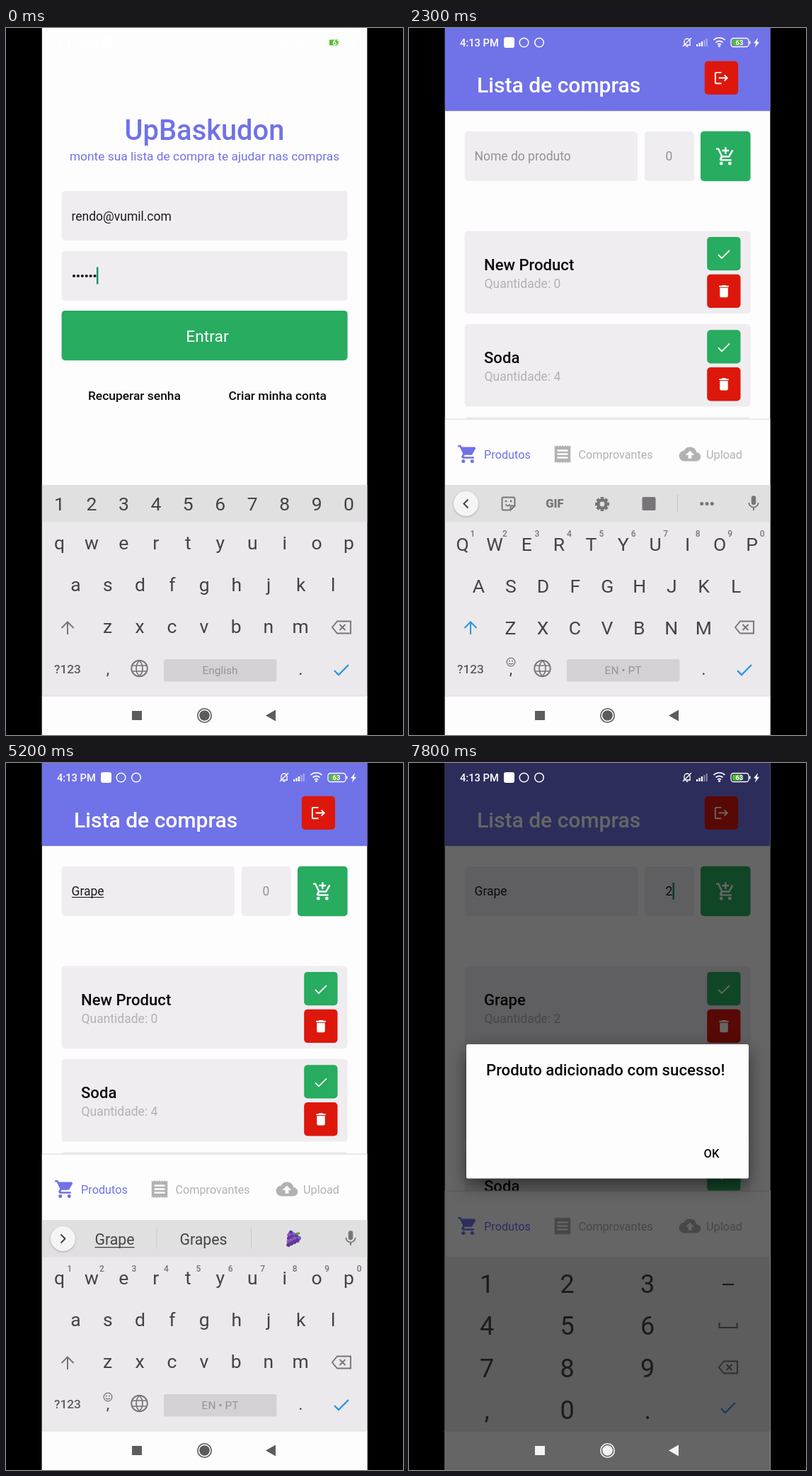
Animation, 561 px wide and 998 px high, one loop 8000 ms. Source, as an HTML page with a canvas:

```html
<!DOCTYPE html>
<html lang="pt">
<head>
<meta charset="utf-8">
<style>
html, body { margin: 0; width: 100%; height: 100%; overflow: hidden; background: #000; }
canvas { display: block; width: 561px; height: 998px; }
</style>
</head>
<body>
<canvas id="stage" width="561" height="998"></canvas>
<script>
const c = document.getElementById('stage').getContext('2d');
const LOOP = 8000, LEFT = 50.6, WIDTH = 460;
const WHITE = '#fefdfe', CARD = '#efedf0', PURPLE = '#7072e8', GREEN = '#27ac60', RED = '#de170c',
  INK = '#1c1b1c', HINT = '#949294', PALE = '#b3b1b3', KEY = '#454346', ICON = '#777577',
  BLUE = '#2b94df', CARET = '#168f68';

const CART = 'M1 2v2h2l3.6 7.6-1.4 2.4A2 2 0 0 0 7 17h12v-2H7.4l1.1-2h7.1a2 2 0 0 0 1.7-1';
const WHEELS = 'M5 20a2 2 0 1 0 4 0a2 2 0 1 0-4 0M15 20a2 2 0 1 0 4 0a2 2 0 1 0-4 0';
const icons = {
  cart: CART + 'L21 5.5 20 4H5.2L4.3 2z' + WHEELS,
  addCart: CART + 'L21.2 5 19.4 4 15.5 11h-7L4.3 2z' + WHEELS + 'M11 9h2V6h3V4h-3V1h-2v3H8v2h3z',
  cloud: 'M19.4 10A7.5 7.5 0 0 0 5.4 8A6 6 0 0 0 6 20h13a5 5 0 0 0 .4-10zM14 13v4h-4v-4H7l5-5 5 5z',
  trash: 'M6 19a2 2 0 0 0 2 2h8a2 2 0 0 0 2-2V7H6zM19 4h-3.5l-1-1h-5l-1 1H5v2h14z',
  exit: 'M17 7l-1.4 1.4L18.2 11H8v2h10.2l-2.6 2.6L17 17l5-5zM4 5h8V3H4a2 2 0 0 0-2 2v14a2 2 0 0 0 2 2h8v-2H4z',
  mic: 'M12 14a3 3 0 0 0 3-3V5a3 3 0 0 0-6 0v6a3 3 0 0 0 3 3zM17.3 11a5.3 5.3 0 0 1-10.6 0H5a7 7 0 0 0 6 6.7V21h2v-3.3a7 7 0 0 0 6-6.7z',
  receipt: 'M3 22' + 'l1.5-1.5 1.5 1.5'.repeat(6) + 'V2' + 'l-1.5 1.5-1.5-1.5'.repeat(6) + 'z'
    + [7, 11, 15].map(y => `M6 ${y}v2h12v-2z`).join('')
};

const clamp = v => Math.max(0, Math.min(1, v));
const inOut = p => p < .5 ? 2 * p * p : 1 - 2 * (1 - p) ** 2;
const ramp = (t, from, span) => inOut(clamp((t - from) / span));
const within = (t, from, to) => t >= from && t < to;

function text(s, x, y, size, color, weight = 400, align = 'left') {
  c.font = `${weight} ${size}px Roboto, sans-serif`;
  c.fillStyle = color;
  c.textAlign = align;
  c.fillText(s, x, y);
  return c.measureText(s).width;
}
const label = (s, x, y, size, color, weight) => text(s, x, y, size, color, weight, 'center');

function rect(x, y, w, h, color) {
  c.fillStyle = color;
  c.fillRect(x, y, w, h);
}

function box(x, y, w, h, color, r = 5) {
  c.fillStyle = color;
  c.beginPath();
  c.roundRect(x, y, w, h, r);
  c.fill();
}

function dot(x, y, r, color) {
  c.fillStyle = color;
  c.beginPath();
  c.arc(x, y, r, 0, 7);
  c.fill();
}

function stroke(path, color, width, x = 0, y = 0) {
  c.save();
  c.translate(x, y);
  c.strokeStyle = color;
  c.lineWidth = width;
  c.stroke(new Path2D(path));
  c.restore();
}

const ring = (x, y, r, color, width) =>
  stroke(`M${-r} 0a${r} ${r} 0 1 0 ${2 * r} 0a${r} ${r} 0 1 0 ${-2 * r} 0`, color, width, x, y);

function icon(name, x, y, size, color) {
  c.save();
  c.translate(x - size / 2, y - size / 2);
  c.scale(size / 24, size / 24);
  c.fillStyle = color;
  c.fill(new Path2D(icons[name]), 'evenodd');
  c.restore();
}

function shadowed(blur, dy, alpha, draw) {
  c.save();
  c.shadowColor = `rgba(0,0,0,${alpha})`;
  c.shadowBlur = blur;
  c.shadowOffsetY = dy;
  draw();
  c.restore();
}

const tick = (x, y, color, width) => stroke('M-8 1l5 5L8-5', color, width, x, y);
const caret = (x, y) => rect(x, y, 2.4, 24, CARET);

function faded(alpha, draw) {
  c.save();
  c.globalAlpha = alpha;
  draw();
  c.restore();
}

// Opacity of a button that is pressed and then released.
function pressAlpha(t, down, up) {
  const low = 1 - .8 * ramp(up, down, 150);
  return t < up ? 1 - .8 * ramp(t, down, 150) : low + (1 - low) * ramp(t, up, 250);
}

function statusBar() {
  text('4:13 PM', 72, 25.5, 14.7, '#fff', 500);
  box(134, 13, 15, 15, '#fff', 3);
  ring(162.5, 20.5, 6.3, '#fff', 1.5);
  ring(184, 20.5, 6.3, '#fff', 1.5);
  stroke('M-5 4H5M-4 4V-1a4 4 0 0 1 8 0V4M-1.5 6h3M-6 6L6-6', '#fff', 1.3, 393, 20);
  for (let i = 0; i < 5; i++) {
    const h = 3 + i * 2;
    rect(406 + i * 3.4, 26 - h, 2.2, h, i < 3 ? '#fff' : 'rgba(255,255,255,.4)');
  }
  stroke('M-8-2a11.5 11.5 0 0 1 16 0M-5 1.5a7 7 0 0 1 10 0M-2.5 4.5a3.5 3.5 0 0 1 5 0', '#fff', 1.7, 438.5, 19);
  dot(438.5, 25.5, 1.6, '#fff');
  c.strokeStyle = '#fff';
  c.lineWidth = 1.3;
  c.beginPath();
  c.roundRect(455, 14.5, 25, 12, 3.5);
  c.stroke();
  rect(481, 18.5, 1.5, 4, '#fff');
  box(457, 16.5, 13, 8, '#55bd2e', 1);
  label('63', 467, 24, 9.5, '#fff', 700);
  c.fillStyle = '#fff';
  c.fill(new Path2D('M493 14l-6 7.5h3.2l-1.2 6 6-7.8h-3.3z'));
}

function navBar(color) {
  rect(178, 964, 14, 13, color);
  ring(280.5, 970.5, 9.7, color, 1.6);
  dot(280.5, 970.5, 7.3, color);
  c.fillStyle = color;
  c.fill(new Path2D('M367 970.5l14-8v16z'));
}

function login(t) {
  rect(LEFT, 0, WIDTH, 998, WHITE);
  label('UpBaskudon', 280.5, 158, 39.8, PURPLE, 500);
  label('monte sua lista de compra te ajudar nas compras', 280.5, 187, 17.35, PURPLE);
  box(78.6, 230, 404, 70, CARD);
  box(78.6, 314.7, 404, 70, CARD);
  text('rendo@vumil.com', 92.5, 272, 17.5, INK);
  for (let i = 0; i < 6; i++) dot(96 + i * 5.9, 350, 2.1, INK);
  if (t < 100 || t >= 600) caret(128, 337.5);
  box(78.6, 398.9, 404, 70.4, GREEN);
  label('Entrar', 284.5, 443, 22.8, '#fff');
  text('Recuperar senha', 116, 525, 17.4, '#0a0a0a', 500);
  text('Criar minha conta', 314.5, 525, 17.4, '#0a0a0a', 500);
}

function card([name, amount], i) {
  const y = 286.5 + i * 131.3;
  box(78.6, y, 404, 116.8, CARD);
  text(name, 106, y + 55.5, 22.1, '#0a0a0a', 500);
  text('Quantidade: ' + amount, 106.5, y + 80.5, 17.5, PALE);
  box(421.2, y + 8.4, 47.3, 47.3, GREEN);
  tick(445, y + 32.5, '#fff', 1.8);
  box(421.2, y + 61.3, 47.3, 47.3, RED);
  icon('trash', 445, y + 85, 23, '#fff');
}

function tabs(top) {
  rect(LEFT, top, WIDTH, 998 - top, WHITE);
  rect(LEFT, top - .5, WIDTH, 1.3, '#e2e1e2');
  const y = top + 49.5;
  icon('cart', 83, y, 30, PURPLE);
  text('Produtos', 106, y + 6, 16.3, PURPLE);
  icon('receipt', 217, y, 30, PALE);
  text('Comprovantes', 239.5, y + 6, 16.2, PALE);
  icon('cloud', 397, y, 30, PALE);
  text('Upload', 420, y + 6, 16.3, PALE);
}

const typed = [[3050, 'G'], [3200, 'Gr'], [3350, 'Gra'], [3580, 'Grap'], [3740, 'Grape'],
  [3860, 'Grapes'], [4580, 'Grape']];
const nameAt = t => typed.reduce((s, [at, word]) => t >= at ? word : s, '');

function shop(t) {
  rect(LEFT, 0, WIDTH, 998, WHITE);
  rect(LEFT, 0, WIDTH, 117.2, PURPLE);
  text('Lista de compras', 96, 91, 30, '#fff', 500);
  box(417.8, 46.8, 47.3, 47.3, RED);
  icon('exit', 441.5, 70.5, 23, '#fff');

  const name = nameAt(t);
  box(78.6, 146, 244.5, 70, CARD);
  const w = text(name || 'Nome do produto', 92.5, 187, 17.5, name ? INK : HINT);
  if (name && t < 5500) rect(93, 189, w - 1, 1.1, INK);
  const nameCaret = within(t, 1800, 2300) || within(t, 2800, 4400) || within(t, 4580, 5200);
  if (nameCaret) caret(92 + (name ? w : 0), 169);

  const filled = t >= 6300;
  box(332.8, 146, 70.2, 70, CARD);
  label(filled ? '2' : '0', 367.5, 187, 17.5, filled ? INK : HINT);
  if (within(t, 5500, 6000) || within(t, 6300, 6800) || t >= 7300)
    caret(filled ? 372.5 : 366.5, 169);

  faded(pressAlpha(t, 6830, 6930), () => {
    box(412, 145.8, 70.6, 70.4, GREEN);
    icon('addCart', 447.3, 181.5, 29, '#fff');
  });

  const items = [['New Product', 0], ['Soda', 4], ['Avocado', 7]];
  if (t >= 7450) items.unshift(['Grape', 2]);
  if (t >= 950) items.forEach(card);
  tabs(t >= 5600 ? 604 : t >= 1900 ? 552 : 849);
}

const rows = [['qwertyuiop', 75.5, 736], ['asdfghjkl', 98.5, 794.5], ['zxcvbnm', 143.5, 853.5]];
const step = 45.45;

function backspace(x, y) {
  stroke('M-13 0L-6-8.5H13V8.5H-6zM-2.5-4l8 8M5.5-4l-8 8', ICON, 1.9, x, y);
}

function chevron(dir) {
  shadowed(3, 1, .25, () => dot(80.5, 671.5, 17.5, '#f6f5f6'));
  stroke(`M${-3 * dir}-6L${3 * dir} 0L${-3 * dir} 6`, KEY, 2, 80.5, 671.5);
}

function toolbar() {
  chevron(-1);
  stroke('M-9-7a2 2 0 0 1 2-2H7a2 2 0 0 1 2 2V3L3 9H-7a2 2 0 0 1-2-2zM9 3H3V9M-4 1q3 4 6 0', ICON, 2, 140.5, 671.5);
  dot(137, 668, 1.4, ICON);
  dot(144, 668, 1.4, ICON);
  label('GIF', 206, 677, 16.5, ICON, 900);
  c.save();
  c.translate(273, 672);
  for (let i = 0; i < 8; i++) {
    c.rotate(Math.PI / 4);
    rect(-2.3, -10, 4.6, 5, ICON);
  }
  c.restore();
  ring(273, 672, 5.5, ICON, 4.2);
  box(329.5, 662, 19, 19, ICON, 2);
  rect(379, 659, 1, 25, '#c4c2c4');
  for (let i = -1; i < 2; i++) dot(421 + i * 7.3, 671.5, 2.5, ICON);
  icon('mic', 487, 671, 26, ICON);
}

function grapes(x, y) {
  c.save();
  c.translate(x, y);
  c.rotate(.6);
  [4, 4, 3, 2, 1].forEach((n, row) => {
    for (let i = 0; i < n; i++)
      dot((i - (n - 1) / 2) * 4.6, row * 4 - 5, 3, (i + row) % 2 ? '#8a55c4' : '#5f3a98');
  });
  stroke('M0-7q1-3 4-4', '#4f9a3b', 3);
  c.restore();
}

const guesses = {
  G: ['Gente', 'Grande'], Gr: ['Grande', 'Grupo'], Gra: ['Graças', 'Grande'],
  Grap: ['Grape', 'Graph'], Grape: ['Grapes', ''], Grapes: ['Grape', '']
};

function suggestions(word) {
  chevron(1);
  const w = label(word, 153.5, 680, 21.3, KEY);
  rect(153.5 - w / 2, 683, w, 1.3, KEY);
  guesses[word].forEach((s, i) => label(s, 279 + i * 126, 680, 21.3, KEY));
  if (word.startsWith('Grape')) grapes(405.5, 671);
  rect(212.5, 657, 1, 29, '#cccacc');
  rect(346, 657, 1, 29, '#cccacc');
  icon('mic', 487, 671, 26, ICON);
}

function letters(upper, plain, word, erasing) {
  rect(LEFT, 645, WIDTH, 298, '#ebe9eb');
  rect(LEFT, 645, WIDTH, 52.5, '#e1e0e1');
  const digits = [...'1234567890'];
  if (plain) digits.forEach((d, i) => label(d, 75.5 + i * step, 681.3, 26.5, KEY));
  else word ? suggestions(word) : toolbar();
  for (const [keys, x, y] of rows)
    [...keys].forEach((k, i) =>
      label(upper ? k.toUpperCase() : k, x + i * step, y + (upper ? 2.2 : 0), 26.5, KEY));
  if (!plain) digits.forEach((d, i) => label(d, 90 + i * step, 717.5, 12, ICON, 500));
  stroke('M0 9V-8M-8.5 0L0-8.5L8.5 0', upper ? BLUE : ICON, 2, 87, 847);
  if (erasing) box(443, 822, 62, 48, '#dad8da');
  backspace(474, 846);
  label('?123', 87, 910.5, 17.3, '#5f5d60', 500);
  label(',', 144, 912, 22, KEY);
  if (!plain) {
    ring(144, 895, 5.8, ICON, 1.3);
    dot(142, 893.5, 1, ICON);
    dot(146, 893.5, 1, ICON);
    stroke('M-3 1.5q3 3 6 0', ICON, 1.2, 144, 895);
  }
  ring(188.5, 904, 11.3, ICON, 1.9);
  stroke('M-10-4H10M-10 4H10M0-11C-6-5-6 5 0 11C6 5 6-5 0-11', ICON, 1.7, 188.5, 904);
  box(223, 891, 159.5, 31.5, '#d3d1d3', 3);
  label(plain ? 'English' : 'EN • PT', 302.5, 912, 15.5, '#969496');
  label('.', 416.5, 913, 24, KEY);
  stroke('M-10 1l6 6L10-7', BLUE, 2.3, 474, 906);
}

function popup(key) {
  for (const [keys, start, y] of rows) {
    const i = keys.indexOf(key.toLowerCase());
    if (i < 0) continue;
    const x = start + i * step;
    shadowed(5, 2, .35, () => box(x - 22, y - 114, 44, 129, WHITE, 4));
    label(key, x, y - 68.5, 32, KEY);
    if (keys === rows[0][0]) label('...', x + 11.5, y - 54.5, 16, KEY);
  }
}

function numberPad() {
  rect(LEFT, 697, WIDTH, 246, '#ebe9eb');
  ['123', '456', '789', ',0.'].forEach((row, r) =>
    [...row].forEach((k, i) => label(k, 110 + i * 113.6, 748 + r * 59.4, 36, KEY)));
  rect(443, 735, 16, 2.2, KEY);
  stroke('M-12.5-5V2H12.5V-5', ICON, 2.2, 451, 795);
  backspace(451, 853);
  stroke('M-10 1l6 6L10-7', BLUE, 2, 451, 910);
}

const popups = [['G', 2960, 3080], ['r', 3120, 3230], ['a', 3280, 3390], ['p', 3450, 3580],
  ['e', 3640, 3750], ['s', 3780, 3870]];

// Share of the keyboard that is below the screen: it leaves speeding up and enters slowing down.
function keyboardHidden(t) {
  return t < 1500 ? clamp((t - 650) / 230) ** 2 : (1 - clamp((t - 1900) / 300)) ** 3;
}

function keyboard(t) {
  const hidden = keyboardHidden(t);
  if (hidden < 1) {
    c.save();
    c.beginPath();
    c.rect(LEFT, 600, WIDTH, 343);
    c.clip();
    c.translate(0, hidden * 298);
    if (t >= 5550) numberPad();
    else letters(within(t, 1500, 3050), t < 1500, nameAt(t), within(t, 4480, 4640));
    for (const [key, from, to] of popups) if (within(t, from, to)) popup(key);
    c.restore();
  }
  rect(LEFT, 943, WIDTH, 55, WHITE);
  if (hidden < 1) rect(LEFT, 942.5, WIDTH, 1, '#e0dee0');
}

function dialog(p) {
  rect(LEFT, 0, WIDTH, 998, `rgba(0,0,0,${.6 * p})`);
  faded(p, () => {
    const s = .9 + .1 * p;
    c.translate(280.5, 491.5);
    c.scale(s, s);
    c.translate(-280.5, -491.5);
    shadowed(24, 9, .5, () => box(81, 397, 399, 189.5, WHITE, 2.5));
    text('Produto adicionado com sucesso!', 109, 441, 22.2, '#0a0a0a', 500);
    text('OK', 416.5, 556.5, 16.5, '#0a0a0a', 500);
  });
}

function draw(t) {
  rect(0, 0, 561, 998, '#000');
  c.save();
  c.beginPath();
  c.rect(LEFT, 0, WIDTH, 998);
  c.clip();
  t < 670 ? login(t) : shop(t);
  keyboard(t);
  const shown = ramp(t, 7450, 300);
  if (shown) dialog(shown);
  statusBar();
  navBar(shown > .4 ? '#f4f3f4' : '#5d5b5e');
  c.restore();
}

const start = performance.now();
function loop(now) {
  draw(Math.max(0, now - start) % LOOP);
  requestAnimationFrame(loop);
}
draw(0);
requestAnimationFrame(loop);
</script>
</body>
</html>
```
